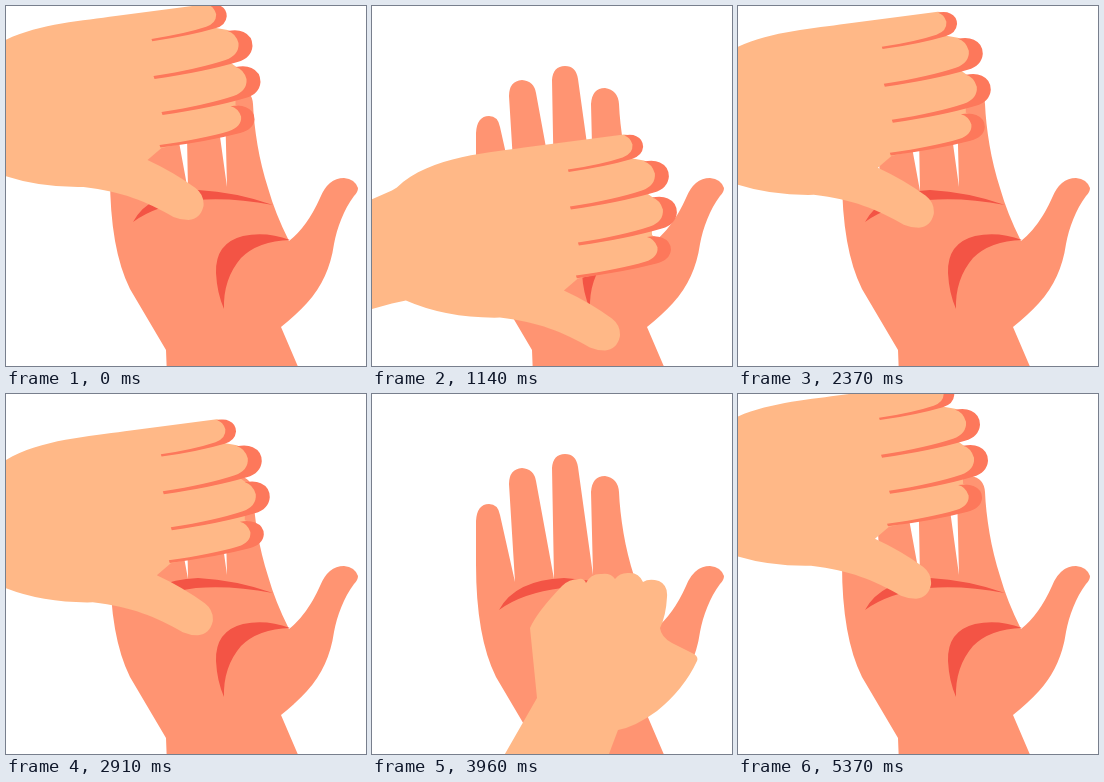
Write an HTML page that moves like this. It is 360 by 360 pixels and loops after 5400 ms.

```html
<!DOCTYPE html>
<html lang="en">
<head>
<meta charset="utf-8">
<title>Rubbing hands</title>
<style>
  html, body { margin: 0; width: 100%; height: 100%; overflow: hidden; background: #fff; }
  svg { display: block; width: 100vw; height: 100vh; }
  .palm { fill: #ff9472; }
  .crease { fill: #f35445; }
  .skin { fill: #ffb887; }
  .shade { fill: #fd785b; }
</style>
</head>
<body>
<svg viewBox="0 0 360 360">
  <defs>
    <path id="edge" d="M0 0Q45 -7 72 -16Q86 -21 85 -33Q82 -43 74 -45Q84 -47 90 -44Q99 -40 99 -30Q98 -18 84 -14Q50 -4 1 3Z"/>
  </defs>

  <path class="palm" d="M161 370L160 344L124 283Q104 243 104 170V127Q105 110 117 110Q126 110 128 121L143 188L137 90Q137 75 150 74Q162 75 164 87L182 185L180 74Q181 60 193 60Q204 60 206 73L221 181L219 98Q220 82 233 82Q246 84 247 98C248 122 253 155 262 182Q269 207 283 235Q301 221 314 192Q322 172 338 172Q349 173 352 182Q352 186 348 190C338 203 331 222 328 238Q323 273 301 297Q290 309 275 321L296 370Z"/>
  <g class="crease">
    <path d="M127 216Q143 186 192 184Q230 186 267 199Q225 191 190 194Q150 199 127 216Z"/>
    <path d="M284 234Q260 225 237 230Q209 237 210 267Q211 287 218 303Q217 273 235 252Q252 235 284 234Z"/>
  </g>

  <g id="flat">
    <path class="skin" d="M-60 166L0 140L5 137C38 105 100 102 140 96L232 84Q243 84 244 93Q244 104 235 107L252 110Q264 113 265 125Q264 138 254 142L261 147Q273 150 274 160Q273 173 260 177L260 185Q271 188 272 196Q271 208 260 212L186 228L172 240Q198 252 220 268Q229 275 228 286Q225 299 213 300Q205 300 198 297C170 281 148 272 108 267Q55 268 14 250L0 253L-60 269Z"/>
    <g class="shade">
      <use href="#edge" transform="translate(176 119) scale(.76)"/>
      <use href="#edge" transform="translate(178 156)"/>
      <use href="#edge" transform="translate(186 192)"/>
      <use href="#edge" transform="translate(184 225) scale(.96 .86)"/>
    </g>
  </g>

  <path id="fist" class="skin" d="M110 400L165 304L158 234Q165 218 190 192Q197 185 207 185Q212 184 214 189Q219 179 230 180Q239 179 243 185Q248 178 258 179Q267 179 271 188Q277 184 287 187Q296 191 295 203Q294 222 288 234Q289 243 300 249L320 259Q327 262 325 267Q312 295 285 317Q263 333 246 336L220 405Z"/>
</svg>
<script>
const PERIOD = 2700, STEP = 30, CURL = 1200, UNCURL = 1500;

const flat = document.getElementById('flat');
const fist = document.getElementById('fist');

// Steady slide towards the wrist, slightly braking
function slideDown(t) {
  const wave = s => Math.sin(s / 1300);
  return [0.0442 * (t - 690), 86 * (wave(t) / wave(690) - 1)];
}

// Fast return that eases out at the fingertips
function slideUp(t) {
  const left = (PERIOD - t) / 1020;
  return [37.5 * left ** 2.3 - 35, 118 * left ** 1.7 - 95.5];
}

// Short rub over the heel of the hand, out and back
function rub(t) {
  const reach = 1 - ((t - 1360) / 100) ** 2;
  return [6.5 * reach, 9 * reach];
}

function place(el, [x, y]) {
  el.setAttribute('transform', `translate(${x} ${y})`);
}

const start = performance.now();

function draw(now) {
  const t = Math.floor(Math.max(0, now - start) % PERIOD / STEP) * STEP;
  const curled = t >= CURL && t < UNCURL;
  flat.style.display = curled ? 'none' : '';
  fist.style.display = curled ? '' : 'none';
  if (curled) place(fist, rub(t));
  else place(flat, t < CURL ? slideDown(t) : slideUp(t));
  requestAnimationFrame(draw);
}
draw(start);
</script>
</body>
</html>
```
